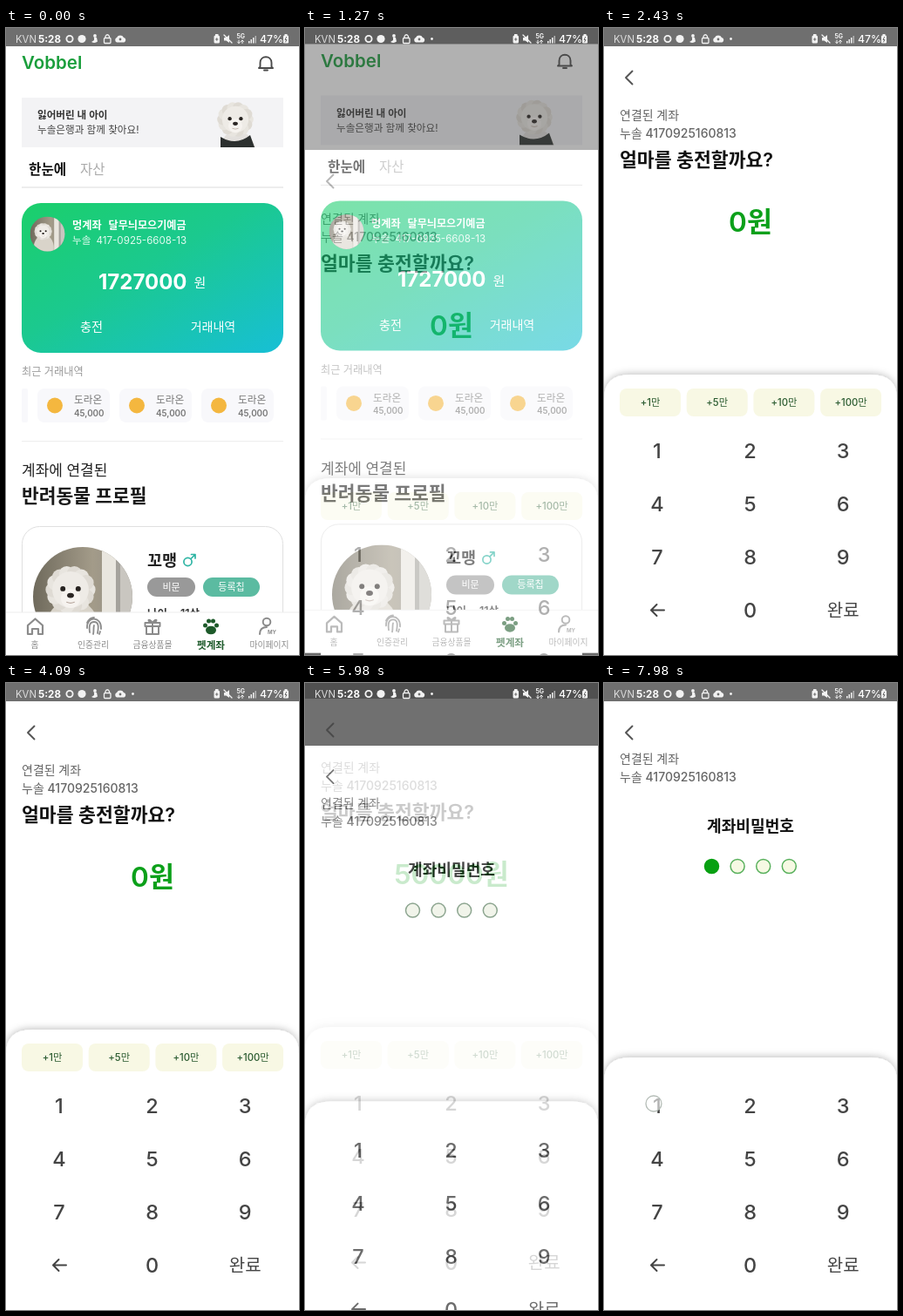
Write an HTML page that moves like this. It is 336 px wide and 720 px high and loops after 8 s.

```html
<!DOCTYPE html>
<html lang="ko">
<head>
<meta charset="utf-8">
<style>
html, body { margin: 0; width: 100%; height: 100%; overflow: hidden; background: #000; }
svg { display: block; width: 336px; height: 720px; }
text { font-family: Inter, 'Noto Sans CJK KR', 'Noto Sans CJK', sans-serif; white-space: pre; }
</style>
</head>
<body>
<svg id="stage" viewBox="0 0 336 720" xmlns="http://www.w3.org/2000/svg">
  <defs>
    <linearGradient id="card" x1="0" y1="0" x2="1" y2="1">
      <stop offset="0" stop-color="#1bcf6b"/><stop offset=".45" stop-color="#1bc98f"/><stop offset="1" stop-color="#17bfd6"/>
    </linearGradient>
    <linearGradient id="room" x1="0" x2="1">
      <stop offset="0" stop-color="#6f6a5c"/><stop offset=".6" stop-color="#a39b89"/><stop offset="1" stop-color="#8f8c86"/>
    </linearGradient>
    <filter id="shade" x="-10%" y="-10%" width="120%" height="120%">
      <feDropShadow dx="0" dy="-1" stdDeviation="4" flood-color="#000" flood-opacity=".26"/>
    </filter>
    <clipPath id="round"><circle r="57"/></clipPath>
    <clipPath id="banner"><rect x="18" y="70" width="300" height="67"/></clipPath>
  </defs>
  <g id="home"></g>
  <g id="charge"></g>
  <g id="secret"></g>
  <g id="status"></g>
  <circle id="tap" r="9" fill="#fff" fill-opacity=".6" stroke="#b4bcb6" stroke-width="1.3"/>
</svg>
<script>
const LOOP = 8000, BAR = '#6f6f6f';
const $ = id => document.getElementById(id);
const clamp = v => Math.max(0, Math.min(1, v));

const rect = (x, y, w, h, fill, r = 0, extra = '') =>
  `<rect x="${x}" y="${y}" width="${w}" height="${h}" rx="${r}" fill="${fill}" ${extra}/>`;
const disc = (x, y, r, fill, extra = '') => `<circle cx="${x}" cy="${y}" r="${r}" fill="${fill}" ${extra}/>`;
const line = (d, color, w = 2) =>
  `<path d="${d}" fill="none" stroke="${color}" stroke-width="${w}" stroke-linecap="round" stroke-linejoin="round"/>`;
const shape = (d, fill) => `<path d="${d}" fill="${fill}"/>`;
// y is the optical middle of the line
const text = (x, y, str, size, fill, weight = 400, anchor = 'start') =>
  `<text x="${x}" y="${y + size * .365}" font-size="${size}" fill="${fill}" font-weight="${weight}" text-anchor="${anchor}">${str}</text>`;
const mid = (x, y, str, size, fill, weight) => text(x, y, str, size, fill, weight, 'middle');
const at = (x, y, body, scale = 1) => `<g transform="translate(${x} ${y}) scale(${scale})">${body}</g>`;

// A fluffy white dog's head, about 50 units wide
function dogHead() {
  let s = '';
  for (let i = 0; i < 14; i++) {
    const a = i / 14 * Math.PI * 2;
    s += disc(Math.cos(a) * 18, Math.sin(a) * 17, 8, i % 2 ? '#dfdbd4' : '#e8e5df');
  }
  return s + disc(0, 0, 19, '#eeebe6') + disc(0, 9, 10, '#f6f3ef') +
    disc(-8, -1, 2.7, '#26221f') + disc(8, -1, 2.7, '#26221f') +
    '<ellipse cx="0" cy="6" rx="3.6" ry="2.7" fill="#2b2624"/>' + line('M-4 13Q0 15 4 13', '#b9a9a0', 1);
}

function portrait() {
  return `<g clip-path="url(#round)">` + rect(-57, -57, 114, 114, 'url(#room)') +
    rect(22, -57, 16, 114, '#e9e6df') + rect(38, -57, 5, 114, '#a5a29c') + rect(43, -57, 20, 114, '#c9c6c0') +
    '<ellipse cx="-12" cy="46" rx="33" ry="44" fill="#d9d4ca"/>' + at(-14, -8, dogHead(), 1.1) + '</g>';
}

function chip(x) {
  return rect(x, 414, 83, 39, '#f8f8fb', 8) + disc(x + 20, 433.5, 9, '#f4b73f') +
    text(x + 42, 427, '도라온', 11.7, '#777') + text(x + 42, 442, '45,000', 9.8, '#777', 600);
}

function navBar() {
  const g = '#8b8b8b', p = '#1d5a2a';
  const labels = [[33, '홈'], [100, '인증관리'], [168, '금융상품몰'], [235, '펫계좌'], [302, '마이페이지']];
  let s = rect(0, 671, 336, 49, '#fff') + rect(0, 670.5, 336, 1, '#eee');
  s += labels.map(([x, t], i) => mid(x, 708.5, t, i === 3 ? 11.6 : 9.8, i === 3 ? p : g, i === 3 ? 700 : 500)).join('');
  s += line('M25 686L33.500 678.500L42 686V696H37V690H30V696H25Z', g, 2.2);
  s += at(101, 687, line('M-8 2C-9 -12 9 -12 8 3M-5 7C-6 -1 -5 -5 0 -5C6 -5 5 2 4 8M-1 9C0 5 -1 2 0 -1M-8 -4Q-5 -10 0 -10M7 6L6 9', g, 1.8));
  s += at(168, 687, line('M-8.500 -4H8.500V0H-8.500ZM-7 1V9H7V1M0 -4V9M0 -4C-7 -5 -5 -11 0 -4C5 -11 7 -5 0 -4', g, 2));
  s += at(235, 687, '<ellipse cx="0" cy="4.500" rx="6" ry="4.800" fill="' + p + '"/>' +
    [[-6.500, -1], [-2.500, -6], [2.500, -6], [6.500, -1]].map(([x, y]) => disc(x, y, 2.5, p)).join(''));
  s += at(299, 687, disc(0, -5, 4.3, 'none', `stroke="${g}" stroke-width="2"`) +
    line('M-8 9C-8 2 -4 1 0 1', g, 2) + text(1, 7, 'MY', 6, g, 700));
  return s;
}

function homePage() {
  const w = '#fff';
  return rect(0, 0, 336, 720, w) + rect(0, 0, 336, 21, BAR) +
    text(18, 40, 'Vobbel', 20.5, '#1a9e3c', 600) +
    line('M291.500 44.500V40C291.500 31 304.500 31 304.500 40V44.500L306 46H290ZM296 48.500H300', '#4a4a4a', 1.9) +
    rect(18, 80, 300, 57, '#f3f3f5') +
    `<g clip-path="url(#banner)">` + shape('M245 140Q249 118 264 118Q281 118 287 140Z', '#e3e0dd') +
    shape('M246 125Q264 136 280 123L285 137H246Z', '#2c302f') + at(263, 105, dogHead(), .8) + '</g>' +
    text(36, 100, '잃어버린 내 아이', 11.6, '#333', 600) +
    text(36, 117, '누솔은행과 함께 찾아요!', 11.6, '#444') +
    text(26, 162, '한눈에', 15.7, '#111', 600) + text(85, 162, '자산', 15.4, '#aaa', 500) +
    rect(18, 182.5, 300, 1, '#dcdcdc') +
    rect(18, 201, 300, 172, 'url(#card)', 22) + at(47.5, 236.5, portrait(), .35) +
    text(76, 227, '멍계좌', 12.2, w, 700) + text(117.5, 227, '달무늬모으기예금', 12.1, w, 600) +
    text(76, 244, '누솔', 11.6, '#e4fbf1') + text(103.5, 244, '417-0925-6608-13', 11.6, '#e4fbf1') +
    text(106, 291, '1727000', 24, w, 700) + text(215.5, 293, '원', 15, w) +
    mid(98, 343, '충전', 14.2, w, 500) + mid(237.5, 343, '거래내역', 14, w, 500) +
    text(18, 395, '최근 거래내역', 12.2, '#9a9a9a') +
    rect(18, 414, 7, 39, '#f8f8fb', 2) + [36, 130, 224].map(chip).join('') +
    rect(18, 474, 300, 1, '#eee') +
    text(18, 508, '계좌에 연결된', 17, '#222', 500) + text(18, 537, '반려동물 프로필', 21.5, '#1a1a1a', 700) +
    rect(18.5, 572.5, 299, 190, w, 20, 'stroke="#e0e0e0"') + at(88, 653, portrait()) +
    text(162, 611, '꼬맹', 18.6, '#222', 700) +
    disc(208.5, 613, 4.6, 'none', 'stroke="#2fb5a4" stroke-width="1.700"') + line('M212 609.500L216.500 605M212.500 604.500H217V609', '#2fb5a4', 1.7) +
    rect(162, 631, 55, 22, '#999', 11) + mid(189.5, 642, '비문', 11, w, 500) +
    rect(226, 631, 65, 22, '#5bbba1', 11) + mid(258.5, 642, '등록칩', 11, w, 500) +
    text(162, 672, '나이', 12.5, '#333', 600) + text(200, 672, '11살', 12.5, '#333', 600) + navBar();
}

// Window with its own bar and keypad sheet; the area above it shows while it rises
function keyWindow(id, top, y, body) {
  const keys = [['1', '2', '3'], ['4', '5', '6'], ['7', '8', '9'], ['', '0', '완료']];
  const c = '#444', crisp = 'shape-rendering="crispEdges"';
  let s = rect(0, -260, 336, 260, '#000', 0, `id="${id}Above" ${crisp}`) + rect(0, 0, 336, 21, BAR, 0, `id="${id}Bar" ${crisp}`) +
    rect(0, 21, 336, 720, '#fff', 0, crisp) +
    line('M32.500 49.500L25 57L32.500 64.500', '#555', 1.9) +
    text(18, y, '연결된 계좌', 14, '#666', 500) + text(18, y + 21, '누솔 4170925160813', 14, '#666', 500);
  s += `<path d="M0 760V${top + 28}Q0 ${top} 30 ${top}H306Q336 ${top} 336 ${top + 28}V760Z" fill="#fff" filter="url(#shade)"/>`;
  keys.forEach((row, r) => row.forEach((k, i) => {
    s += mid(61 + i * 106.6, 485.5 + r * 61.1, k, k.length > 1 ? 20 : 23.5, c, 500);
  }));
  return s + line('M69 668.500H54.500M60.500 662L54 668.500L60.500 675', c, 2) + body;
}

function chargeBody() {
  const sums = ['+1만', '+5만', '+10만', '+100만'];
  return text(18, 151, '얼마를 충전할까요?', 21.6, '#111', 600) +
    `<text id="sum" x="168" y="234.300" font-size="31.500" font-weight="600" fill="#0ca01a" text-anchor="middle"></text>` +
    sums.map((t, i) => rect(18 + i * 76.7, 414, 70, 32, '#f8f8e4', 8) + mid(53 + i * 76.7, 430, t, 11.3, '#2c5c31', 500)).join('');
}

function secretBody() {
  return mid(168, 164, '계좌비밀번호', 18.1, '#111', 600) + '<g id="dots" stroke-width="1.500">' +
    [0, 1, 2, 3].map(i => disc(123.5 + i * 29.6, 210.5, 8, '#f6f9e3')).join('') + '</g>';
}

function statusBar() {
  const w = '#f2f2f2';
  return text(11, 12.5, 'KVN', 11.3, '#ddd') + text(37, 12.5, '5:28', 11.6, '#fff', 700) +
    disc(73, 12.5, 3.6, 'none', `stroke="${w}" stroke-width="1.900"`) + disc(87, 12.5, 4.6, w) +
    disc(102, 9, 1.9, w) + shape('M101 11H104L105 15.500Q102 18 98 16L101 14Z', w) +
    rect(112.5, 11.5, 7.5, 6, 'none', 1, `stroke="${w}" stroke-width="1.300"`) + line('M114 11V9.500Q116.200 6 118.500 9.500V11', w, 1.3) +
    shape('M127 16.500A3 3 0 0 1 127 11A4.500 4.500 0 0 1 135 11A2.900 2.900 0 0 1 135.500 16.500Z', w) + disc(131, 13, 1.4, BAR) +
    `<circle id="more" cx="145.500" cy="12.500" r="1.400" fill="${w}"/>` +
    rect(238.5, 8.5, 6.5, 9, w, 1.5) + rect(240, 7, 3.5, 2, w) + line('M240.500 13H243M241.750 11.700V14.300', BAR, 1) +
    shape('M250 11H252.500L256 8V17L252.500 14.500H250Z', w) + line('M250 8L259 17', w, 1.3) +
    text(264.5, 9.5, '5G', 7, w, 700) + line('M267 14V17.500M265.500 16L267 17.500L268.500 16M271 17.500V14M269.500 15.500L271 14L272.500 15.500', w, 1) +
    [0, 1, 2, 3].map(i => rect(278 + i * 2.5, 15 - i * 2, 1.5, 2.5 + i * 2, i > 2 ? '#b5b5b5' : w)).join('') +
    text(291, 12.5, '47%', 12.2, '#fff', 500) +
    rect(318, 8.5, 6, 9, w, 1.3) + rect(319.5, 7, 3, 2, w) + line('M321.500 10.500L320 13.500H322L320.500 16', BAR, 1);
}

$('home').innerHTML = homePage();
$('charge').innerHTML = keyWindow('charge', 398, 100, chargeBody());
$('secret').innerHTML = keyWindow('secret', 430, 87, secretBody());
$('status').innerHTML = statusBar();

const taps = [[97, 343, 790, 1060], [130, 430, 4350, 4570], [274, 668, 5600, 5770], [57, 483, 7900, LOOP]];
const dots = [...$('dots').children];
const move = (el, y) => el.setAttribute('transform', `translate(0 ${y.toFixed(2)})`);
const mix = (a, b, k) => `rgb(${a.map((v, i) => Math.round(v + (b[i] - v) * k))})`;

// The next window fades in while it rises; the one below drifts up a little
function rise(next, under, start, t) {
  const p = clamp((t - start) / 480), alpha = clamp(p / .6);
  const el = $(next), veil = '#484848';
  el.style.display = p > 0 ? '' : 'none';
  el.setAttribute('opacity', alpha);
  move(el, 246 * Math.pow(1 - p, 2.5));
  $(next + 'Above').setAttribute('fill', alpha < 1 ? veil : '#000');
  $(next + 'Bar').setAttribute('fill', alpha < 1 ? veil : BAR);
  if (p > 0) move($(under), -3 * clamp(p * 3.4));
  else if (under === 'home') move($(under), 0);
}

function draw(t) {
  rise('charge', 'home', 1150, t);
  rise('secret', 'charge', 5756, t);
  $('more').style.display = t >= 300 ? '' : 'none';
  $('sum').textContent = (t < 4560 ? '0' : '50000') + '원';

  const k = clamp((t - 6120) / 270);
  const edge = mix([108, 140, 112], [88, 176, 92], k), fill = mix([238, 241, 229], [246, 249, 227], k);
  dots.forEach((d, i) => {
    const on = i === 0 && t >= 7910;
    d.setAttribute('fill', on ? '#08a012' : fill);
    d.setAttribute('stroke', on ? '#08a012' : edge);
  });

  const hit = taps.find(a => t >= a[2] && t < a[3]), tap = $('tap');
  tap.style.display = hit ? '' : 'none';
  if (hit) {
    tap.setAttribute('cx', hit[0]);
    tap.setAttribute('cy', hit[1]);
  }
}

const begin = performance.now();
function tick() {
  draw((performance.now() - begin) % LOOP);
  requestAnimationFrame(tick);
}
draw(0);
tick();
</script>
</body>
</html>
```
